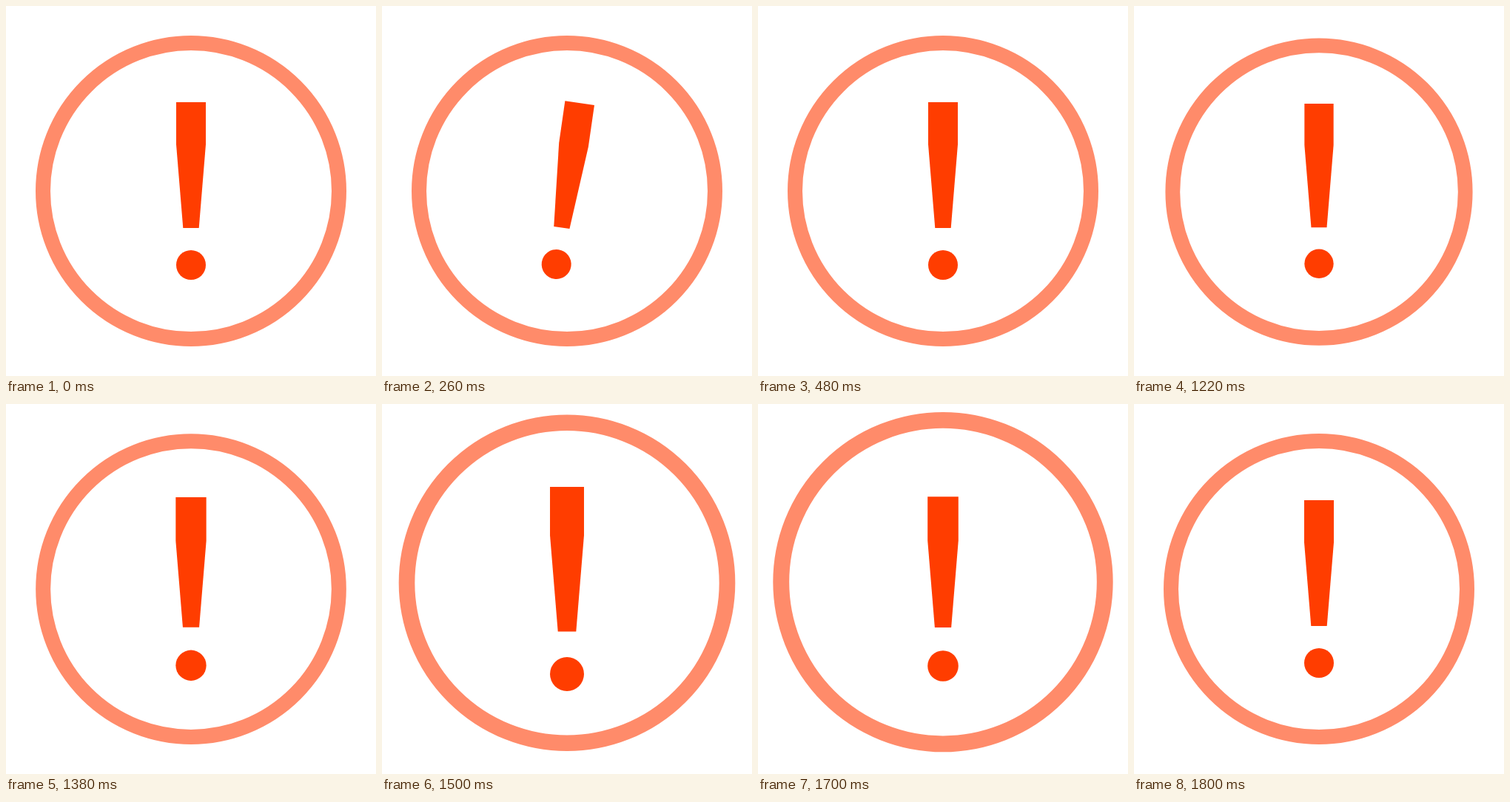
Recreate the animation shown at these times as an HTML page with a canvas. Size 500 by 500 pixels, loop 3600 ms.

```html
<!DOCTYPE html>
<html lang="en">
<head>
<meta charset="utf-8">
<title>Alert</title>
<style>
  html, body { margin: 0; width: 100%; height: 100%; overflow: hidden; background: #fff; }
  canvas { display: block; width: 500px; height: 500px; }
</style>
</head>
<body>
<canvas id="stage" width="500" height="500"></canvas>
<script>
const ctx = document.getElementById('stage').getContext('2d');
const LOOP = 3600, STEP = 20;
const MARK = '#ff3d00', RING = '#ff8b6a';

const sineOut = p => Math.sin(p * Math.PI / 2);
const sineInOut = p => (1 - Math.cos(p * Math.PI)) / 2;

// Keys: [time, scale, easing into this key]
const ringKeys = [
  [1200, 1], [1280, 0.97, sineOut], [1659, 1.15], [1771, 0.96], [1800, 1]
];
const markKeys = [
  [1200, 1], [1280, 0.955, sineOut], [1510, 1.15], [1800, 1]
];

function track(keys, t) {
  if (t <= keys[0][0]) return keys[0][1];
  for (let i = 1; i < keys.length; i++) {
    const [t0, v0] = keys[i - 1];
    const [t1, v1, ease = sineInOut] = keys[i];
    if (t < t1) return v0 + (v1 - v0) * ease((t - t0) / (t1 - t0));
  }
  return keys[keys.length - 1][1];
}

// Three half swings of 90 ms each
function swing(t) {
  if (t <= 200 || t >= 470) return 0;
  return 9.5 * Math.PI / 180 * Math.sin((t - 200) / 90 * Math.PI);
}

function around(x, y, scale, angle, paint) {
  ctx.save();
  ctx.translate(x, y);
  ctx.rotate(angle);
  ctx.scale(scale, scale);
  ctx.translate(-x, -y);
  paint();
  ctx.restore();
}

function drawRing() {
  ctx.strokeStyle = RING;
  ctx.lineWidth = 20;
  ctx.beginPath();
  ctx.arc(250, 250, 200, 0, Math.PI * 2);
  ctx.stroke();
}

function drawMark() {
  ctx.fillStyle = MARK;
  ctx.beginPath();
  ctx.moveTo(230, 130);
  ctx.lineTo(270, 130);
  ctx.lineTo(270, 187);
  ctx.lineTo(260.7, 300);
  ctx.lineTo(239.3, 300);
  ctx.lineTo(230, 187);
  ctx.closePath();
  ctx.fill();
  ctx.beginPath();
  ctx.arc(250, 350, 20, 0, Math.PI * 2);
  ctx.fill();
}

function render(t) {
  ctx.fillStyle = '#fff';
  ctx.fillRect(0, 0, 500, 500);
  around(250, 350, track(ringKeys, t), 0, drawRing);
  around(250, 250, track(markKeys, t), swing(t), drawMark);
}

const start = performance.now();
function tick() {
  const t = (performance.now() - start) % LOOP;
  render(Math.floor(t / STEP) * STEP);
  requestAnimationFrame(tick);
}
tick();
</script>
</body>
</html>
```
